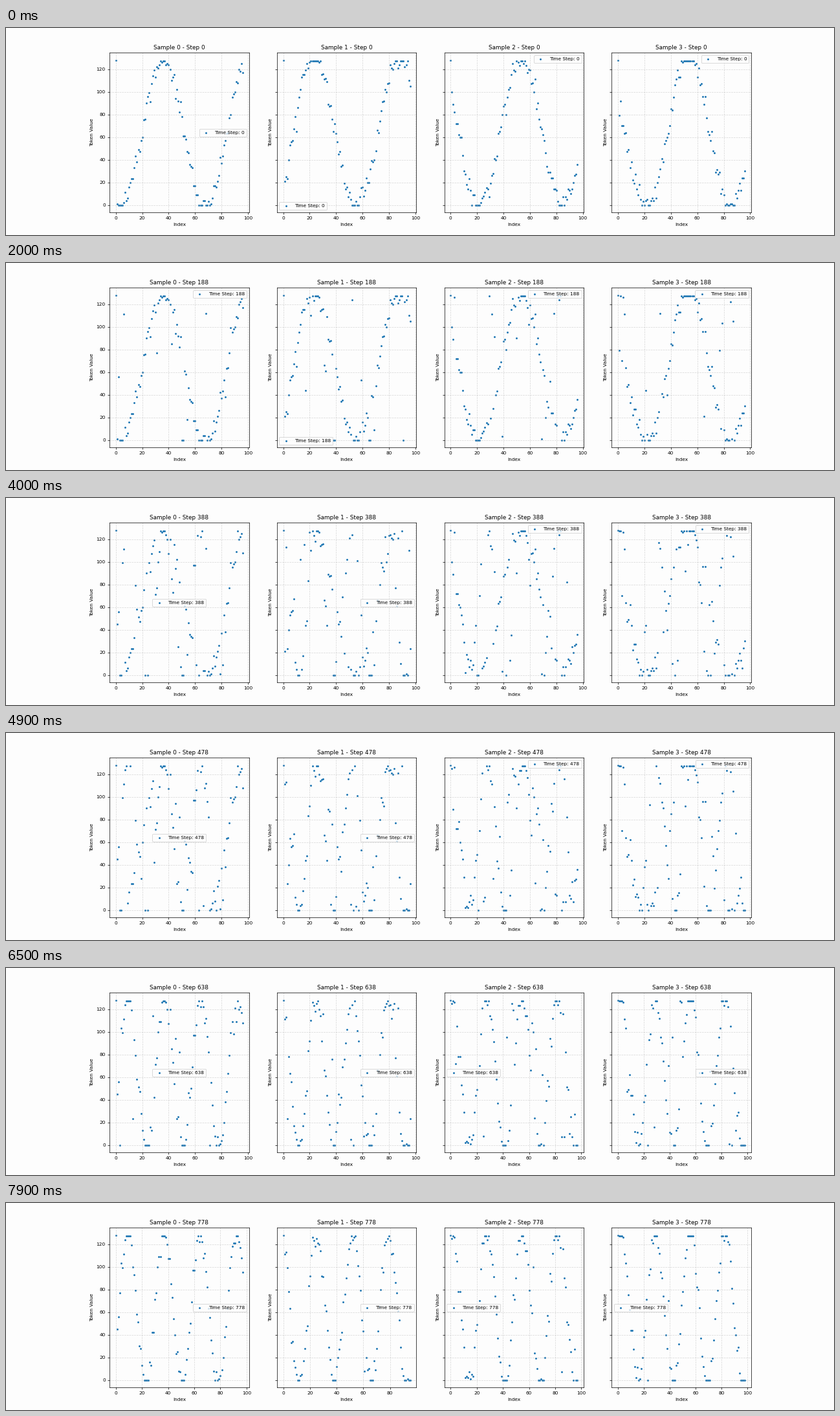
These frames come from a looping animation (1280 px wide and 320 px high, 8000 ms). A matplotlib script:

```python
import numpy as np
import matplotlib.pyplot as plt
from matplotlib.animation import FuncAnimation

FRAMES, INTERVAL = 80, 100
TOP = 127            # largest token value
START = 128          # start token, always first
LENGTH = 99          # longest sequence shown
PAPER = "#fdfdfd"

# Per sample: (rising midpoint, period) of the first and last wave,
# then (frame, value) schedules for the token count and the legend place.
SAMPLES = [
    dict(first=(19, 65), last=(2.2, 27.6),
         count=[(0, 97), (74, 98)],
         place=[(0, "center right"), (8, "upper right"),
                (26, "center"), (75, "center right")]),
    dict(first=(7.5, 63.8), last=(18.2, 27),
         count=[(0, 97), (54, 96), (65, 97), (75, 96)],
         place=[(0, "lower left"), (40, "center right")]),
    dict(first=(37.4, 63), last=(21, 27),
         count=[(0, 97), (54, 98)],
         place=[(0, "upper right"), (54, "center left")]),
    dict(first=(37, 64.5), last=(22.3, 26.8),
         count=[(0, 97), (54, 98), (64, 99)],
         place=[(0, "upper right"), (65, "center right"),
                (75, "center left")]),
]

rng = np.random.default_rng(7)
index = np.arange(LENGTH)


def noisy_wave(middle, period):
    wave = 64 + 66 * np.sin(2 * np.pi * (index - middle) / period)
    values = np.clip(np.rint(wave + rng.normal(0, 5.5, LENGTH)), 0, TOP)
    values[0] = START
    return values


def scheduled(plan, frame):
    return [value for begin, value in plan if begin <= frame][-1]


def step_at(frame):
    return max(frame, 10 * frame - 12)


plt.rcParams.update({
    "font.family": "DejaVu Sans",
    "axes.titlesize": 10,
    "axes.labelsize": "small",
    "xtick.labelsize": "small",
    "ytick.labelsize": "small",
    "legend.fontsize": "small",
    "figure.facecolor": PAPER,
    "axes.facecolor": PAPER,
})


class Panel:
    def __init__(self, ax, number, sample):
        self.ax, self.number, self.sample = ax, number, sample
        self.first = noisy_wave(*sample["first"])
        self.last = noisy_wave(*sample["last"])
        # Each token jumps to its new value once, most often mid-way.
        self.jump = 850 * rng.beta(2, 2, LENGTH)
        self.dots = ax.scatter([], [], s=5, color="#1f77b4",
                               label="Time Step: 0")
        self.title = ax.set_title("")
        self.legend = ax.legend(loc="upper right")
        ax.set(xlabel="Index", ylabel="Token Value", ylim=(-6.4, 134.4),
               xticks=range(0, 101, 20), yticks=range(0, 121, 20))
        ax.grid(True, linestyle="--", alpha=0.5)

    def show(self, frame):
        step = step_at(frame)
        count = scheduled(self.sample["count"], frame)
        values = np.where(self.jump <= step, self.last, self.first)
        self.dots.set_offsets(np.column_stack([index, values])[:count])

        # Ticks beyond the margin drop out as the limits change.
        end = count - 1
        self.ax.set_xlim(-0.05 * end, 1.05 * end)
        self.title.set_text(f"Sample {self.number} - Step {step}")
        self.legend.get_texts()[0].set_text(f"Time Step: {step}")
        self.legend.set_loc(scheduled(self.sample["place"], frame))


fig, axes = plt.subplots(1, 4, figsize=(20, 5), dpi=64, sharey=True)
panels = [Panel(ax, n, sample)
          for n, (ax, sample) in enumerate(zip(axes, SAMPLES))]


def update(frame):
    for panel in panels:
        panel.show(frame)
    return []


anim = FuncAnimation(fig, update, frames=FRAMES, interval=INTERVAL,
                     init_func=lambda: update(0), repeat=True,
                     repeat_delay=0, blit=False)
plt.show()
```
